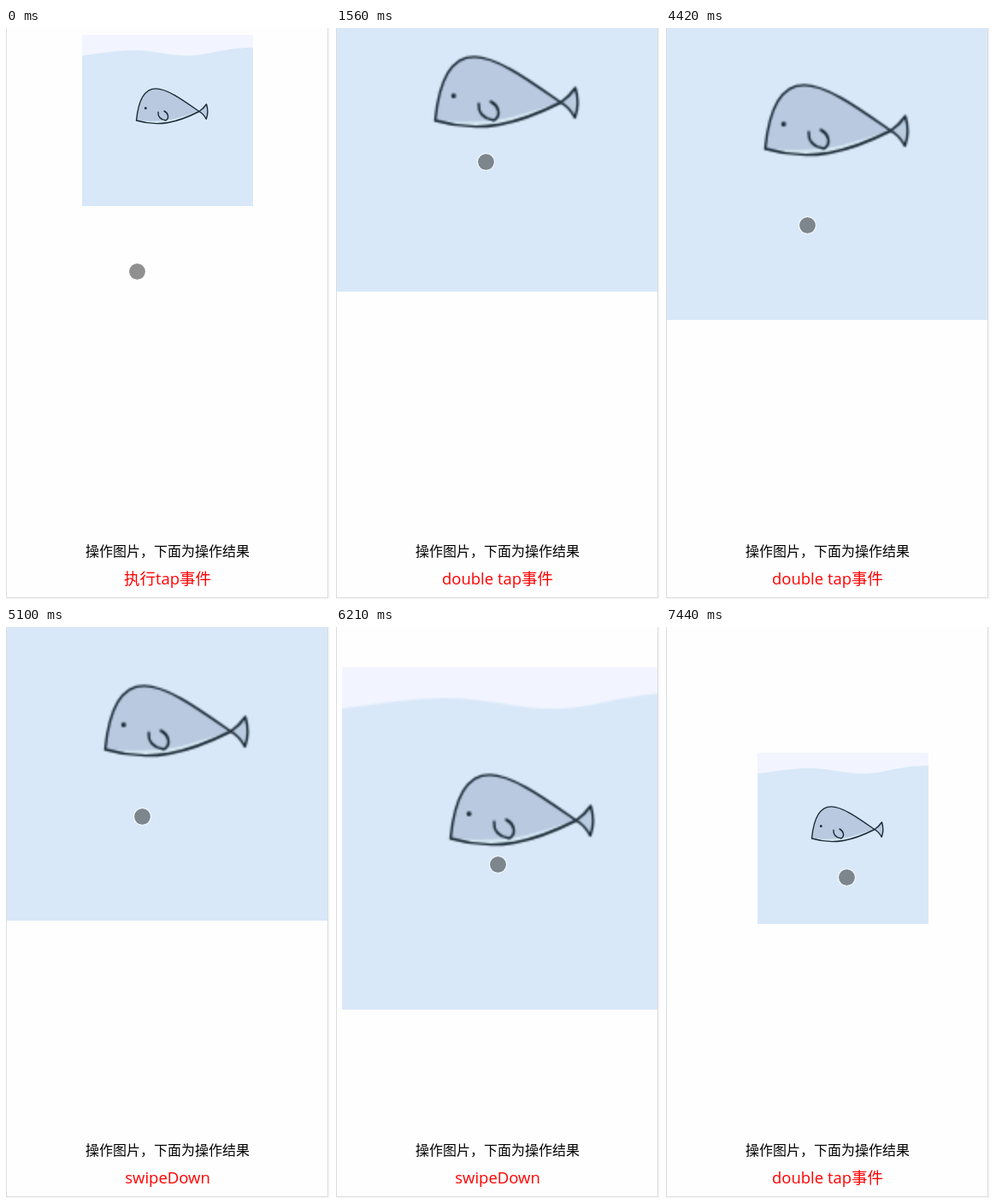
Write an HTML page with a canvas that moves like this. It is 379 px wide and 667 px high and loops after 8000 ms.

```html
<!DOCTYPE html>
<html lang="zh-CN">
<head>
<meta charset="utf-8">
<title>Gesture demo</title>
<style>
html, body { margin: 0; width: 100%; height: 100%; overflow: hidden; background: #fff; }
canvas { display: block; width: 379px; height: 667px; }
</style>
</head>
<body>
<canvas id="stage"></canvas>
<script>
const W = 379, H = 667, LOOP = 8000;
const canvas = document.getElementById('stage');
const ctx = canvas.getContext('2d');
const dpr = window.devicePixelRatio || 1;
canvas.width = W * dpr;
canvas.height = H * dpr;

const FONT = '"Open Sans", "Noto Sans CJK SC", "Noto Sans CJK", sans-serif';
const INK = '#1a2935';

// The screen refreshes at this pace, in step with the first double tap.
const REFRESH = 136.7;
const ZOOM_IN = 1560, SWIPED = 4700, ZOOM_OUT = 6480;

// Strokes: start, end, and the point reached
const fingerHome = [153.5, 284.5];
const fingerStrokes = [
  [60, 193, 160, 357],
  [193, 340, 173.5, 182.5],
  [340, 800, 175.5, 156.5],
  [1560, 1970, 162, 196],
  [2700, 2790, 166.5, 177.5],
  [3750, 3884, 165.5, 187],
  [4157, 4430, 165.5, 230.5],
  [4567, 4841, 159.5, 242],
  [4841, 5114, 159.5, 221.5],
  [5524, 5797, 176.5, 284.5],
  [5797, 5934, 190, 340],
  [5934, 6100, 189.5, 277.5],
  [6600, 6891, 172, 313],
  [6891, 7438, 211.5, 292.5]
];

const pictureHome = [189, 108];
const pictureStrokes = [
  [4157, 4430, 189, 141],
  [4430, 4567, 189, 143],
  [5600, 5797, 189, 158],
  [5797, 5934, 207, 247]
];

function glide(home, strokes, t) {
  let [x, y] = home;
  for (const [start, end, toX, toY] of strokes) {
    const p = Math.min(1, Math.max(0, (t - start) / (end - start)));
    const e = (1 - Math.cos(Math.PI * p)) / 2;
    x += (toX - x) * e;
    y += (toY - y) * e;
  }
  return [x, y];
}

function disc(c, x, y, r, color) {
  c.fillStyle = color;
  c.beginPath();
  c.arc(x, y, r, 0, Math.PI * 2);
  c.fill();
}

// The picture is a 200 px bitmap, so it softens when zoomed.
function paintPicture() {
  const image = document.createElement('canvas');
  image.width = image.height = 200;
  const c = image.getContext('2d');
  const fill = (path, color) => {
    c.fillStyle = color;
    c.fill(path);
  };

  const back = 'M63.5 100C65.3 81.5 71 62.9 86.3 62.9C100 62.9 119 77 137 89.5';
  const body = new Path2D(back + 'C112 102 90 108 63.5 100Z');
  const shade = new Path2D(back + 'C122 93 108 100.5 88 100.5Q75 101 63.5 100Z');
  const tail = new Path2D('M137 89.5Q142 86 145.5 81Q148.3 90 145.3 98.3Q141.5 92 137 89.5Z');
  const flipper = new Path2D('M89 90.2C88.5 96 92 99 98 100C102.5 97 100.5 91 96 89');
  const foam = new Path2D('M0 0V24.3C20 22 38 18 60 18C85 18 100 24.2 124 24.2C150 24.2 162 15 200 15V0Z');

  c.fillStyle = '#d8e8f8';
  c.fillRect(0, 0, 200, 200);
  fill(foam, '#f2f5ff');
  fill(body, '#d6e9f4');
  fill(shade, '#b8c9e0');
  fill(tail, '#b9cce0');
  c.strokeStyle = INK;
  c.lineWidth = 1.4;
  c.lineJoin = c.lineCap = 'round';
  for (const path of [body, tail, flipper]) c.stroke(path);
  disc(c, 74.3, 85.7, 1.4, INK);
  return image;
}

const picture = paintPicture();

function drawPage() {
  ctx.fillStyle = '#f8f8f8';
  ctx.fillRect(0, 0, W, H);
  ctx.fillStyle = '#dcdcdc';
  ctx.fillRect(0, 0, 377, 666);
  ctx.fillStyle = '#fefefe';
  ctx.fillRect(1, 0, 375, 665);
}

function drawPicture(x, y, zoom) {
  const size = 200 * zoom;
  ctx.save();
  ctx.beginPath();
  ctx.rect(1, 0, 375, 665);
  ctx.clip();
  ctx.drawImage(picture, Math.round(x - size / 2), Math.round(y - size / 2), size, size);
  ctx.restore();
}

function drawText(text, y, size, color) {
  ctx.font = size + 'px ' + FONT;
  ctx.fillStyle = color;
  ctx.textAlign = 'center';
  ctx.fillText(text, 189, y);
}

function drawFinger(x, y) {
  disc(ctx, x, y, 9.6, 'rgba(33,33,33,0.5)');
  ctx.strokeStyle = 'rgba(255,255,255,0.7)';
  ctx.lineWidth = 1.2;
  ctx.beginPath();
  ctx.arc(x, y, 10, 0, Math.PI * 2);
  ctx.stroke();
}

function message(t) {
  if (t < ZOOM_IN) return '执行tap事件';
  return t >= SWIPED && t < ZOOM_OUT ? 'swipeDown' : 'double tap事件';
}

function render(now) {
  const step = Math.floor((now % LOOP - ZOOM_IN + 15) / REFRESH);
  const t = ZOOM_IN + step * REFRESH;
  const zoom = t >= ZOOM_IN && t < ZOOM_OUT ? 2 : 1;
  ctx.setTransform(dpr, 0, 0, dpr, 0, 0);
  drawPage();
  drawPicture(...glide(pictureHome, pictureStrokes, t), zoom);
  drawText('操作图片，下面为操作结果', 617, 16, '#000');
  drawText(message(t), 650, 18.5, '#f00');
  drawFinger(...glide(fingerHome, fingerStrokes, t));
}

const start = performance.now();
function tick() {
  render(performance.now() - start);
  requestAnimationFrame(tick);
}
tick();
</script>
</body>
</html>
```
